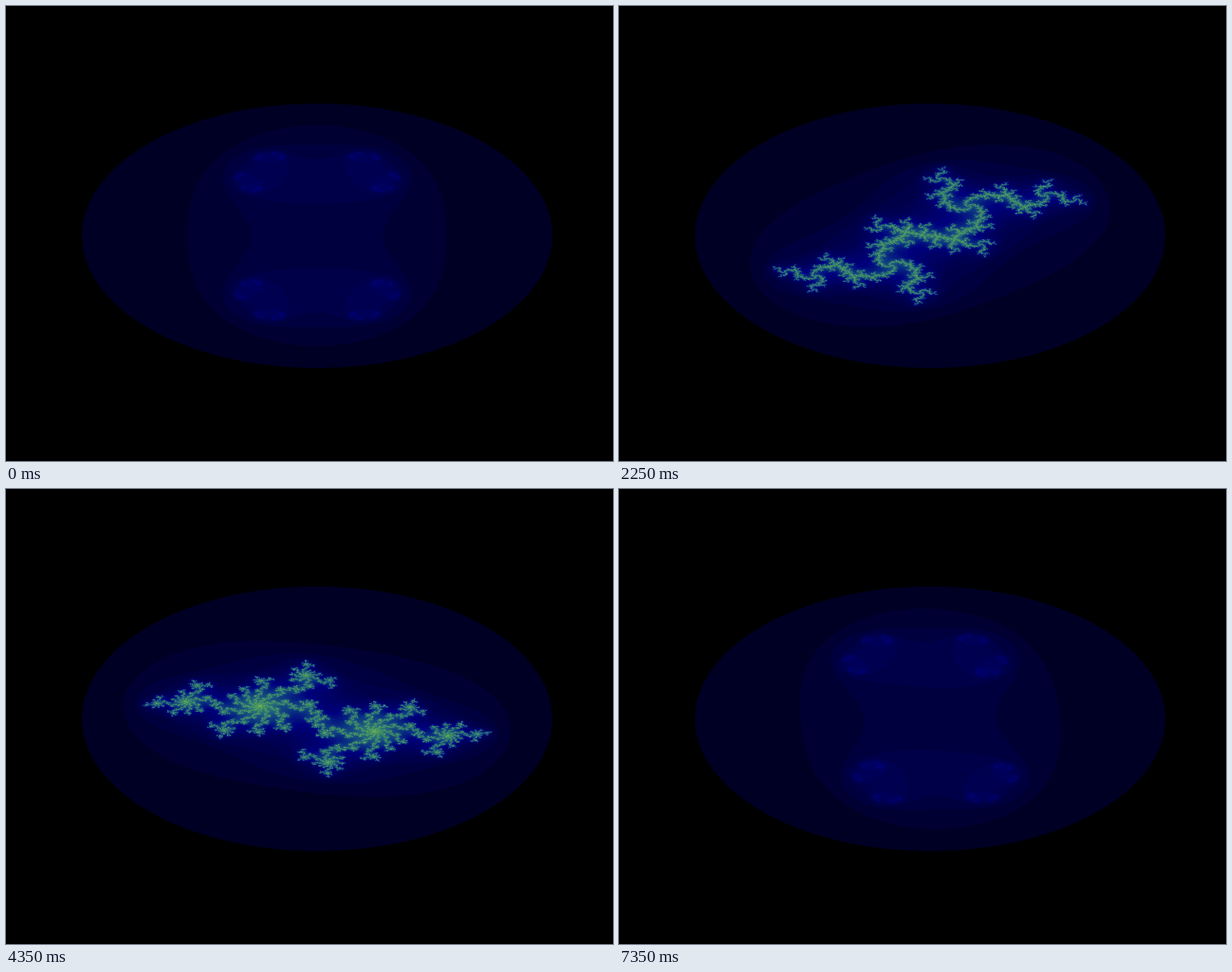
Write an HTML page with a canvas that moves like this. It is 640 by 480 pixels and loops after 7500 ms.

```html
<!DOCTYPE html>
<html lang="en">
<head>
<meta charset="utf-8">
<title>Julia set</title>
<style>
  html, body { margin: 0; width: 100%; height: 100%; overflow: hidden; background: #000; }
  canvas { display: block; }
</style>
</head>
<body>
<canvas id="stage" width="640" height="480"></canvas>
<script>
const STEPS = 50, STEP_MS = 150, MAX_ITER = 255;
const RADIUS = 0.7885;
const LEFT = 80, TOP = 103, WIDTH = 496, HEIGHT = 279;
const CENTER_X = 328, CENTER_Y = 242.4, UNIT_X = 124, UNIT_Y = 69.75;
const SAMPLES = 2;

// [iterations, red, green, blue]
const STOPS = [
  [12, 0, 0, 125], [20, 10, 50, 130], [35, 35, 100, 125],
  [60, 60, 145, 100], [100, 110, 165, 80], [255, 250, 250, 240]
];

function colorOf(n) {
  if (n <= 12) return [0, 0, 36 * Math.sqrt(n)];
  const i = STOPS.findIndex(stop => stop[0] >= n);
  const a = STOPS[i - 1], b = STOPS[i];
  const k = (n - a[0]) / (b[0] - a[0]);
  return [1, 2, 3].map(j => a[j] + (b[j] - a[j]) * k);
}

const palette = Array.from({ length: MAX_ITER + 1 }, (_, n) => colorOf(n));

function escapeCount(x, y, cx, cy) {
  let n = 0;
  while (n < MAX_ITER) {
    const xx = x * x, yy = y * y;
    if (xx + yy > 4) break;
    y = 2 * x * y + cy;
    x = xx - yy + cx;
    n++;
  }
  return n;
}

const ctx = document.getElementById('stage').getContext('2d');
const image = ctx.createImageData(WIDTH, HEIGHT);

function draw(step) {
  const angle = 2 * Math.PI * step / STEPS;
  const cx = RADIUS * Math.cos(angle), cy = RADIUS * Math.sin(angle);
  let p = 0;
  for (let row = 0; row < HEIGHT; row++) {
    for (let col = 0; col < WIDTH; col++) {
      let r = 0, g = 0, b = 0;
      for (let s = 0; s < SAMPLES * SAMPLES; s++) {
        const dx = (s % SAMPLES + 0.5) / SAMPLES;
        const dy = (Math.floor(s / SAMPLES) + 0.5) / SAMPLES;
        const x = (LEFT + col + dx - CENTER_X) / UNIT_X;
        const y = (TOP + row + dy - CENTER_Y) / UNIT_Y;
        const color = palette[escapeCount(x, y, cx, cy)];
        r += color[0];
        g += color[1];
        b += color[2];
      }
      const total = SAMPLES * SAMPLES;
      image.data[p++] = r / total;
      image.data[p++] = g / total;
      image.data[p++] = b / total;
      image.data[p++] = 255;
    }
  }
  ctx.putImageData(image, LEFT, TOP);
}

const start = performance.now();
let shown = -1;

function tick() {
  const step = Math.floor((performance.now() - start) / STEP_MS) % STEPS;
  if (step !== shown) draw(shown = step);
  requestAnimationFrame(tick);
}
tick();
</script>
</body>
</html>
```
